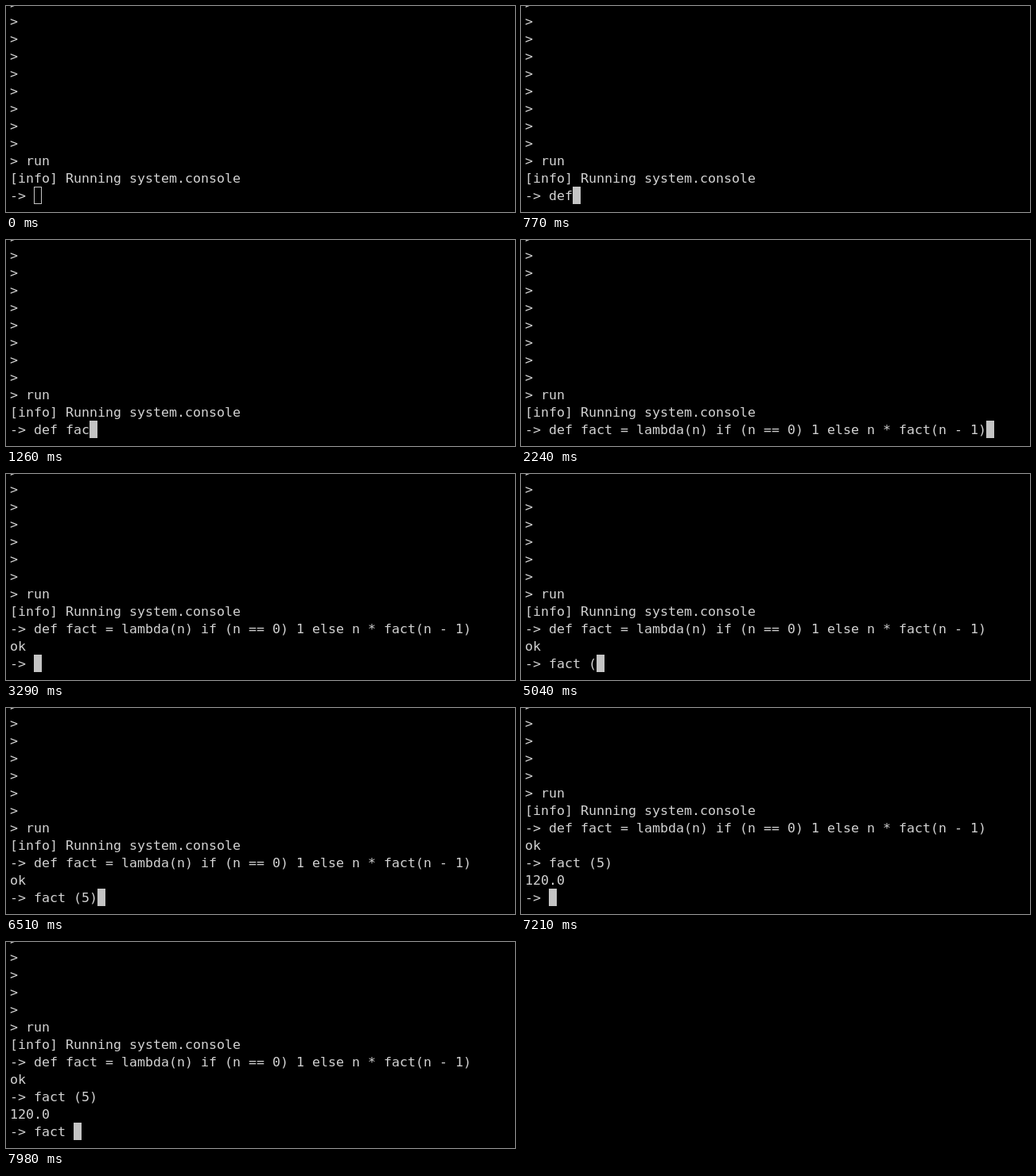
An HTML page with a canvas for the animation above (8000 ms loop, 640 by 260 pixels).

```html
<!DOCTYPE html>
<html lang="en">
<head>
<meta charset="utf-8">
<title>Console session</title>
<style>
html, body { margin: 0; width: 100%; height: 100%; overflow: hidden; background: #000; }
canvas { display: block; }
</style>
</head>
<body>
<canvas id="stage" width="640" height="260"></canvas>
<script>
const ctx = document.getElementById('stage').getContext('2d');
const LOOP = 8000, CELL = 10, LINE = 22, LEFT = 5, BOTTOM = 250, ROWS = 12;

const intro = [...Array(9).fill('>'), '> run', '[info] Running system.console'];

// Each entry: time in ms and the text added to the session from then on.
const events = [
  [0, '-> '],
  [560, 'de'], [770, 'f'], [840, ' '],
  [1050, 'f'], [1120, 'a'], [1260, 'c'],
  [1540, 't '], [1820, '='], [1890, ' '],
  [2100, 'lambda(n) if (n == 0) 1 else n * fact(n - 1)'],
  [3290, '\nok\n-> '],
  [4270, 'f'], [4340, 'a'], [4480, 'c'], [4690, 't '], [5040, '('],
  [6230, '5'], [6510, ')'],
  [7140, '\n120.0\n-> '],
  [7420, 'f'], [7490, 'a'], [7560, 'c'], [7630, 't'], [7770, ' ']
];

function draw(t) {
  const typed = events.filter(([at]) => at <= t).map(([, text]) => text).join('');
  const lines = [...intro, ...typed.split('\n')].slice(-ROWS);
  const top = BOTTOM - lines.length * LINE;

  ctx.fillStyle = '#000';
  ctx.fillRect(0, 0, 640, 260);
  ctx.font = '16.61px "DejaVu Sans Mono", monospace';
  ctx.fillStyle = '#d2d2d2';
  lines.forEach((line, i) => ctx.fillText(line, LEFT, top + i * LINE + 17));

  const x = LEFT + lines[lines.length - 1].length * CELL, y = BOTTOM - LINE;
  if (t < 70) {
    ctx.strokeStyle = '#c4c4c4';
    ctx.strokeRect(x + 0.5, y + 0.5, CELL - 1, LINE - 1);
  } else {
    ctx.fillStyle = '#c4c4c4';
    ctx.fillRect(x, y, CELL, LINE);
  }
}

function frame() {
  draw(performance.now() % LOOP);
  requestAnimationFrame(frame);
}
frame();
</script>
</body>
</html>
```
